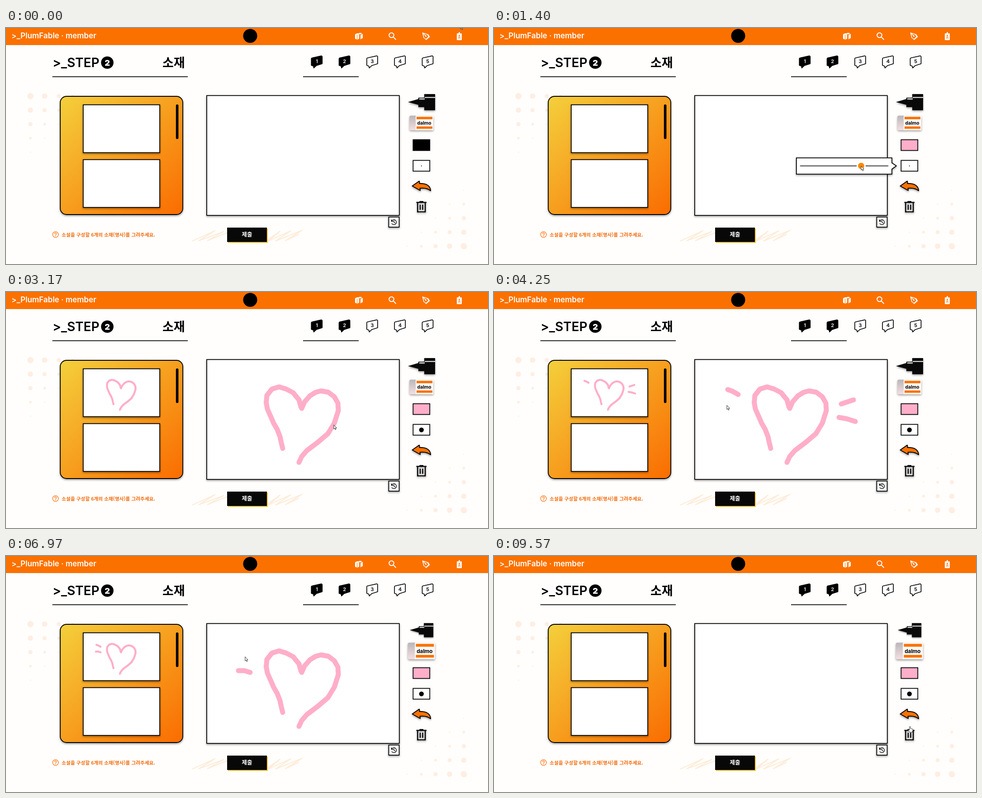
An HTML page for the animation above (9590 ms loop, 1066 by 525 pixels).

```html
<!DOCTYPE html>
<html lang="ko">
<head>
<meta charset="utf-8">
<title>Drawing step</title>
<style>
  html, body { margin: 0; width: 100%; height: 100%; overflow: hidden; background: #fffefd; }
  svg { display: block; width: 100%; height: 100%; }
  text { font-family: Inter, 'Noto Sans CJK KR', 'Noto Sans CJK', sans-serif; font-weight: 600; }
  .ko { font-family: 'Noto Sans CJK KR', 'Noto Sans CJK', sans-serif; font-weight: 700; }
  .mid { text-anchor: middle; }
  .shadow { filter: drop-shadow(0 2px 2px #0006); }
  .box { fill: #fff; stroke: #000; stroke-width: 1.8; }
  .ink { fill: none; stroke-width: 11; stroke-linecap: round; stroke-linejoin: round; }
</style>
</head>
<body>
<svg viewBox="0 0 1066 525" preserveAspectRatio="none">
  <defs>
    <linearGradient id="cardFill" x1="0" y1="0" x2="1" y2="1">
      <stop stop-color="#f4d03c"/><stop offset="1" stop-color="#fa6c00"/>
    </linearGradient>
    <linearGradient id="rubberFill" x1="0" y1="0" x2="0" y2="1">
      <stop stop-color="#b9b6b9"/><stop offset="1" stop-color="#f6dfe1"/>
    </linearGradient>
    <path id="bubble" d="M1.3 7.3Q1.2 6 3 5.5L22.7 1.2Q25.3 .8 25.3 3V18.5L12 22.8 6.8 28 6 24 1.3 22Z" stroke="#000" stroke-width="1.7" stroke-linejoin="round"/>
  </defs>

  <g id="dots" fill="#ffeee2"></g>

  <!-- header -->
  <rect width="1066" height="38" fill="#fb7100"/>
  <text x="12" y="23" font-size="17" fill="#fff">&gt;_PlumFable · member</text>
  <circle cx="540" cy="17.5" r="15.5"/>
  <g fill="#fff">
    <path d="M772 14l5-2.5 4 1.2v11l-4 2-5-1.8zM778 12.5l5-2 5 1.5-4.500 2zM783 15.500l6-2.500v9.500l-6 3z"/>
    <path d="M776.500 15v10M784 14v11" stroke="#fb7100"/>
    <g fill="none" stroke="#fff" stroke-width="2">
      <circle cx="852.5" cy="16" r="5.3"/><path d="M856.500 20l6 6"/>
      <path d="M921.500 11l10 3 3.500 5-6 6-5-3.500zM922 11.500l6.500 6.500M933 14l3.500 5.500-8 7" stroke-width="1.500"/>
    </g>
    <circle cx="928.5" cy="18" r="1.7"/>
    <path d="M998 12h3v-2.500h3V12h3q1 0 1 1v13q0 1-1 1h-9q-1 0-1-1V13q0-1 1-1z"/>
    <g fill="#fb7100"><circle cx="1002.5" cy="16.500" r="1.600"/><path d="M999.500 21q3-4 6 0zM999.500 22.500h6v1h-6z"/></g>
  </g>

  <!-- step heading -->
  <text x="103" y="87" font-size="28">&gt;_STEP</text>
  <circle cx="224" cy="77" r="13.800"/>
  <text class="mid" x="224" y="83.500" font-size="18" fill="#fff" style="font-weight:900">2</text>
  <text class="ko" x="346" y="87" font-size="27">소재</text>
  <path d="M102.500 108.300H402M657 108.300H780" stroke="#000" stroke-width="1.800"/>
  <g id="steps"></g>

  <!-- gallery -->
  <rect class="shadow" x="120" y="152" width="271" height="263" rx="14" fill="url(#cardFill)" stroke="#000" stroke-width="1.800"/>
  <g class="shadow">
    <rect class="box" x="170.800" y="170.800" width="169.200" height="106.500"/>
    <rect class="box" x="170.800" y="292.800" width="169.200" height="106.300"/>
  </g>
  <rect x="375.800" y="170" width="5.600" height="77" rx="2.800"/>
  <g id="thumb" transform="translate(171 171) scale(.397) translate(-444 -150)"></g>

  <!-- drawing board -->
  <rect class="box shadow" x="444" y="150.300" width="425.800" height="266.500"/>
  <g id="board"></g>
  <g class="shadow"><rect class="box" x="846.500" y="420.500" width="23" height="22.500"/></g>
  <path d="M853 429.500a5.500 5.500 0 1 1 0 5M852.500 426v4h4M858 428.500v3.500l2.700 1.800" fill="none" stroke="#000" stroke-width="1.400"/>

  <!-- caption and submit -->
  <g fill="none" stroke="#ff7410" stroke-width="1.300">
    <circle cx="109.500" cy="459.500" r="6.300"/>
    <path d="M107.300 458q.2-2.200 2.200-2.200t2.200 2q0 1.200-2.200 2.400v1M109.500 462v1.400"/>
  </g>
  <text class="ko" x="123" y="463.500" font-size="10.700" fill="#f26a08">소설을 구성할 6개의 소재(명사)를 그려주세요.</text>
  <path d="M412 474L462 451 427 473 481 453 446 473 490 455M576 473L606 452 580 474 630 451 596 474 655 450 618 473 648 459" fill="none" stroke="#feecd8" stroke-width="2.200" stroke-linejoin="round"/>
  <rect x="491" y="446" width="88" height="32" fill="#f8c630"/>
  <rect x="489" y="444" width="88" height="32" fill="#080808"/>
  <text class="ko mid" x="533" y="464" font-size="12.500" fill="#fff">제출</text>

  <!-- tools -->
  <g id="pen"><g class="shadow">
    <path d="M889 164.800L912 158V155H925V147H949V183H925V176H912V171Z" fill="#090909"/>
    <path d="M926 154.500H949M914 157.800H926" stroke="#fff" stroke-width="2.200"/>
  </g></g>
  <g id="eraser"><g class="shadow">
    <rect x="892.500" y="195" width="18" height="32.500" rx="3" fill="url(#rubberFill)"/>
    <path d="M906 195H945V227.500H906Z" fill="#fff9f5"/>
    <path d="M908 197.500H943V203H908ZM908 219H943V224.300H908Z" fill="#fa7200"/>
    <text class="mid" x="925" y="215" font-size="10.300" style="font-weight:700">dalmo</text>
  </g></g>
  <rect id="swatch" class="box" x="900.300" y="248.500" width="37" height="24"/>
  <rect class="box" x="900.300" y="294.500" width="37" height="24"/>
  <circle id="sizeDot" cx="918.800" cy="306.700"/>
  <path class="shadow" d="M898.500 351.500L914 340.500 914.500 346C929 345 939 351 939 362 932 356 924 355.500 915.500 356.500L916 361.500Z" fill="#fa7200" stroke="#000" stroke-width="2" stroke-linejoin="round"/>
  <g class="shadow" fill="none" stroke="#0a0a0a" stroke-width="2.600">
    <path d="M907.500 388H930M914.500 386.200H923M910.300 389V409H927.200V389M916 393V404.500M921.500 393V404.500"/>
  </g>

  <!-- popups -->
  <g id="palette">
    <path class="box shadow" d="M626 220H880V253L889.500 260 880 267V300H626Z"/>
  </g>
  <g id="slider">
    <path class="box shadow" d="M668.800 288.800H880V300L889.800 306.800 880 314V325.200H668.800Z"/>
    <path d="M678 306.800H871" stroke="#777" stroke-width="3" stroke-linecap="round"/>
    <circle id="knob" cy="306.800" r="8.500" fill="#fb8a00" stroke="#fff" stroke-width="3"/>
  </g>

  <!-- pointers -->
  <g fill="#fff" stroke="#222" stroke-width=".9" stroke-linejoin="round">
    <path id="arrow" d="M0 0V9.200L2 7.400 3.500 10.800 5 10.100 3.500 6.900H6.300Z"/>
    <path id="hand" d="M-1.200 1Q0-.8 1.200 1V5Q2 4.200 3 5.200 4 4.600 4.700 5.600 6.200 5.300 6.200 7V9.500L5 13H-.5L-3.800 8.800Q-3.700 7-2 7.700L-1.200 8.500Z"/>
  </g>
</svg>
<script>
const LOOP = 9590, PINK = '#ffaec9', CLEARED = 9290;
const PICKED = 980, RESIZED = 1540, ERASER_ON = 4780;
const $ = id => document.getElementById(id);
const clamp = v => Math.max(0, Math.min(1, v));
const ease = v => v * v * (3 - 2 * v);

function add(parent, tag, attrs, text) {
  const el = document.createElementNS('http://www.w3.org/2000/svg', tag);
  for (const name in attrs) el.setAttribute(name, attrs[name]);
  if (text) el.textContent = text;
  return parent.appendChild(el);
}
const show = (el, on) => el.setAttribute('visibility', on ? 'visible' : 'hidden');

// Halftone corners
const dotRadii = [7, 6, 4.8, 3, 1.5];
for (let row = 0; row < 5; row++)
  for (let col = 0; col < 5 - row; col++) {
    const r = dotRadii[row + col];
    add($('dots'), 'circle', { cx: 54 + col * 31.3, cy: 151.5 + row * 31.2, r });
    add($('dots'), 'circle', { cx: 1012.5 - col * 31.3, cy: 485.5 - row * 31.2, r });
  }

for (let i = 0; i < 5; i++) {
  const done = i < 2, x = 674 + i * 61.3;
  add($('steps'), 'use', { href: '#bubble', x, y: 61, fill: done ? '#000' : '#fff' });
  add($('steps'), 'text', { class: 'mid', x: x + 13.5, y: 77.5, 'font-size': 11, fill: done ? '#fff' : '#000' }, i + 1);
}

['#000', '#7f7f7f', '#880015', '#ed1c24', '#ff7f27', '#fff200', '#22b14c', '#00a2e8', '#3f48cc', '#a349a4',
 '#fff', '#c3c3c3', '#b97a57', PINK, '#ffc90e', '#efe4b0', '#b5e61d', '#99d9ea', '#7092be', '#c8bfe7']
  .forEach((fill, i) => add($('palette'), 'rect', {
    x: 636 + i % 10 * 24, y: i < 10 ? 232 : 265, width: 18, height: 23, fill, stroke: '#000'
  }));

// Each stroke: start, end, points, and for the eraser the time it is undone
const strokes = [
  [1950, 2290, '652 255 648 240 635 224 620 216 604 211 588 216 577 230 575.500 246 578 260 585 276 592 292 600 306 606 322 609 336 612 348'],
  [2560, 3040, '654 259 660 245 672 231 685 223 697 220 713 223 726 233 734 247 735 264 726 292 712 315 690 334 665 353 654 366 648 379'],
  [3260, 3400, '768 249 780 245 795 240'],
  [3560, 3680, '763 279 780 282 799 288'],
  [3960, 4080, '517 217 528 221 540 228'],
  [4290, 4420, '514 255 527 255 540 259'],
  [5230, 5794, '800 239 764 252 797 240 766 250 762 276 800 250 764 283 802 289 764 278', 8590],
  [6730, 7680, '545 230 512 214 545 226 510 222 546 238 505 252 546 256 508 260 546 264 508 252', 8110]
].map(([start, end, points, undone]) => {
  const attrs = { class: 'ink', d: 'M' + points, stroke: undone ? '#fff' : PINK };
  if (undone) attrs.style = 'stroke-width:13px';
  const live = add($('board'), 'path', { ...attrs, pathLength: 1 });
  const copy = add($('thumb'), 'path', attrs);
  const length = copy.getTotalLength();
  const at = p => { const q = copy.getPointAtLength(p * length); return [q.x, q.y]; };
  return { start, end, until: undone || CLEARED, live, copy, at };
});

// Pointer stops between strokes: time, x, y
const stops = [
  [0, 1005, -7], [250, 1038, 60], [520, 922, 260], [600, 920, 260], [940, 717, 276], [1000, 717, 276],
  [1150, 922, 309], [1190, 920, 309], [1360, 812, 307], [1550, 812, 307], [1910, 652, 255],
  [4250, 515, 252], [4740, 918, 212], [4850, 918, 212], [6130, 930, 352], [6200, 930, 352], [6420, 760, 196],
  [8040, 921, 348], [8290, 921, 348], [8360, 920, 348], [8640, 920, 348], [9010, 920, 393],
  [9540, 920, 393], [9570, 920, 379], [LOOP, 920, 379]
];
for (const s of strokes) stops.push([s.start, ...s.at(0)], [s.end, ...s.at(1)]);
stops.sort((a, b) => a[0] - b[0]);

function pointerAt(t) {
  const active = strokes.find(s => t >= s.start && t < s.end);
  if (active) return active.at((t - active.start) / (active.end - active.start));
  const i = stops.findIndex(s => s[0] > t);
  const [a, b] = [stops[i - 1], stops[i]];
  const k = ease((t - a[0]) / (b[0] - a[0]));
  return [a[1] + (b[1] - a[1]) * k, a[2] + (b[2] - a[2]) * k];
}

const scaleAbout = (el, x, y, k) =>
  el.setAttribute('transform', `translate(${x} ${y}) scale(${k}) translate(${-x} ${-y})`);

function draw(t) {
  for (const s of strokes) {
    const p = clamp((t - s.start) / (s.end - s.start));
    show(s.live, p > 0 && t < s.until);
    show(s.copy, t >= s.end + 20 && t < s.until);
    s.live.setAttribute('stroke-dasharray', p < 1 ? p + ' 3' : 'none');
  }

  const erasing = clamp((t - ERASER_ON) / 90);
  scaleAbout($('pen'), 919, 164.8, 1 - .13 * erasing);
  scaleAbout($('eraser'), 918.8, 211.3, 1 + .14 * erasing);

  $('swatch').style.fill = t < PICKED ? '#000' : PINK;
  $('sizeDot').setAttribute('r', t < RESIZED ? 1 : 5.2);
  show($('palette'), t >= 560 && t < 1010);
  show($('slider'), t >= 1180 && t < 1660);
  $('knob').setAttribute('cx', t < 1370 ? 690 : 812);

  const [x, y] = pointerAt(t), overTool = x > 892 && x < 948 && y > 146;
  for (const id of ['arrow', 'hand']) {
    $(id).setAttribute('transform', `translate(${x} ${y})`);
    show($(id), overTool === (id === 'hand'));
  }
}

const began = performance.now();
function frame() {
  draw((performance.now() - began) % LOOP);
  requestAnimationFrame(frame);
}
frame();
</script>
</body>
</html>
```
